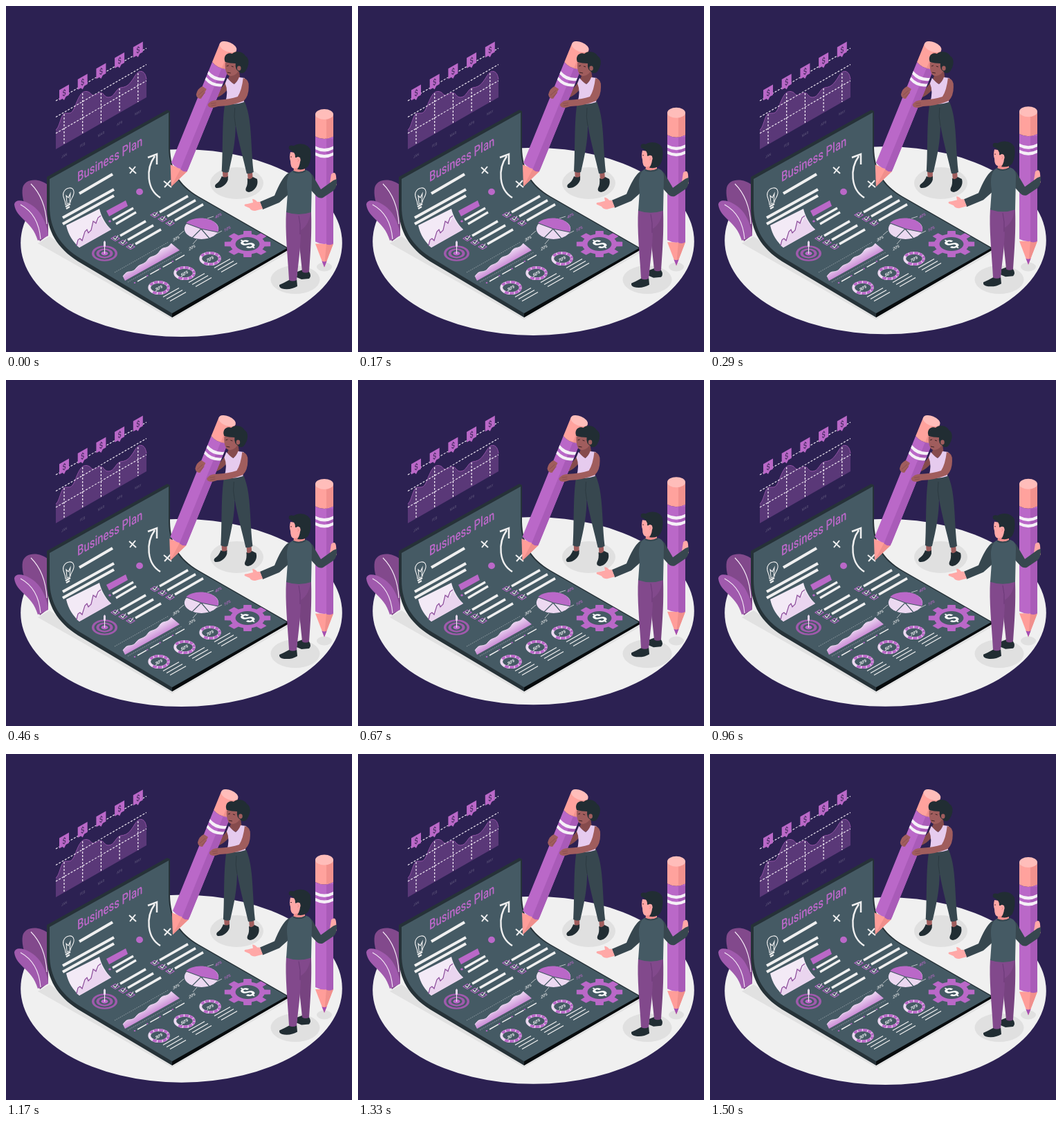
Animation, 500 px wide and 500 px high, one loop 1.54 s. Source, as an HTML page with a canvas:

```html
<!DOCTYPE html>
<html lang="en">
<head>
<meta charset="utf-8">
<title>Business plan</title>
<style>
html, body { margin: 0; width: 100%; height: 100%; overflow: hidden; background: #2c2152; }
canvas { display: block; }
</style>
</head>
<body>
<canvas id="stage" width="500" height="500"></canvas>
<script>
const ctx = document.getElementById('stage').getContext('2d');
const LOOP = 1540, STEP = 1000 / 24, CYCLE = 1500, LEAD_IN = 36;
const C = {
  bg: '#2c2152', floor: '#f0f0f0', shade: '#e0e0e0', paper: '#455a64', ink: '#263238',
  purple: '#ba68c8', deep: '#82498c', leaf: '#a05aad', pale: '#ecd9f1', white: '#fff',
  pants: '#37474f', skin: '#ffa8a7', brown: '#a05d5d', brownDark: '#864b4d', hair: '#212d33'
};

const fill = (d, color) => { ctx.fillStyle = color; ctx.fill(new Path2D(d)); };
const line = (d, color = C.floor, width = 1, dash = []) => {
  ctx.strokeStyle = color;
  ctx.lineWidth = width;
  ctx.setLineDash(dash);
  ctx.stroke(new Path2D(d));
  ctx.setLineDash([]);
};
const oval = (x, y, rx, ry, color) => {
  ctx.fillStyle = color;
  ctx.beginPath();
  ctx.ellipse(x, y, rx, ry, 0, 0, 7);
  ctx.fill();
};
const arc = (x, y, rx, ry, from, to, color, width) => {
  ctx.strokeStyle = color;
  ctx.lineWidth = width;
  ctx.beginPath();
  ctx.ellipse(x, y, rx, ry, 0, from, to);
  ctx.stroke();
};
const within = (matrix, draw) => {
  ctx.save();
  ctx.transform(...matrix);
  draw();
  ctx.restore();
};
const shifted = (x, y, draw) => within([1, 0, 0, 1, x, y], draw);
const wall = (x, y, draw) => within([0.8, -0.455, 0, 1, x, y], draw);
const ground = (x, y, draw) => within([0.85, -0.49, 0.85, 0.49, x, y], draw);
const label = (text, size, color, weight = 400, align = 'center') => {
  ctx.font = `${weight} ${size}px Roboto, sans-serif`;
  ctx.textAlign = align;
  ctx.textBaseline = 'alphabetic';
  ctx.fillStyle = color;
  ctx.fillText(text, 0, 0);
};

function floatingChart() {
  const wave = 'M72 179C78 175 79 155 86 155C92 155 95 156 99 147C105 131 109 123 116 123.5C123 124 122 129 127 129C132 129 132 125 137 125.5C142 126 142 132 148 132C157 132 158 120 166 118C176 117 179 112 184 105C189 96 192 94 196 94.5C201 96 202 101 203 106';
  fill(wave + 'V132L72 207Z', '#5a3878');
  line(wave, '#9353a6', 1);
  for (const y of [137, 160.5, 184]) line(`M72 ${y}L203 ${y - 76}`, '#f5eff8', 1.1, [3, 2]);
  const tops = [156, 126, 126, 119, 97];
  ['JAN', 'FEB', 'MAR', 'APR', 'MAY'].forEach((month, i) => {
    const x = 84 + 26.7 * i, y = 125.5 - 15.5 * i;
    line(`M${x} ${tops[i]}V${200 - 15.3 * i}`, '#f5eff8', 1.2, [3, 2]);
    fill(`M${x - 7} ${y - 4}l14 -8v15l-4.5 2.6l-2.5 5l-2.5 -2.2l-4.5 2.6Z`, C.purple);
    wall(x, y + 4, () => label('$', 11.5, '#4b2d66', 500));
    wall(x, 218 - 15.5 * i, () => label(month, 5.4, '#625b7d'));
  });
}

function plant() {
  fill('M49 340C34 304 21 282 24 263C27 249 48 248 61 259V331Z', C.deep);
  fill('M46 339C37 309 15 308 12 287C13 275 38 283 49 299C58 312 61 328 61 332Z', C.leaf);
  line('M36 257Q57 278 59 315M21 287Q47 301 50 337', '#f4e9f6', 1.1);
}

function sheet() {
  fill('M46 343L63 333L110 366L240 446L408 349L414 353L240 453Z', '#e1e1e1');
  fill('M59 247L233 150L237 152V205C238 238 250 258 278 275L407 349V353L240 450L104 369C74 350 59 325 59 292Z', C.ink);
  fill('M240 444L407 348.5V353L240 450Z', '#070b0d');
  fill('M63 250L235 154V206C236 239 249 260 277 276L406 350L240 444L108 365C78 347 63 322 63 289Z', C.paper);
}

function bulb() {
  line('M86 287C86 279 81 277 83 270C86 262 97 260 98 268C99 275 93 278 93 284ZM88 285L87 274L90 277L93 271L92 283', C.floor, 1.1);
  line('M86 290L93 286M87 293L92 290', C.floor, 2.2);
}

function checklist(x, y, length) {
  for (let i = 0; i < 3; i++) {
    const px = x + 11 * i, py = y + 6 * i;
    line(`M${px - 6} ${py}l6 -3.6l6 3.6l-6 3.6Z`, C.purple, 1.1);
    line(`M${px - 3} ${py - 1}l3 2.5l4 -6`, C.floor, 1.1);
    line(`M${px + 7} ${py - 4}l${length} ${-length * 0.57}`, C.floor, 3.6);
  }
}

function target() {
  oval(142.5, 357.5, 18.5, 11.3, C.leaf);
  oval(142.5, 357.5, 15, 9, C.paper);
  oval(142.5, 357.5, 12, 7.2, C.leaf);
  oval(142.5, 357.5, 8, 4.7, C.paper);
  oval(142.5, 357.5, 5, 3, C.purple);
  line('M142.5 358V343', C.floor, 1.1);
  fill('M141 347V341L142.5 339L144 341V347L142.5 349Z', C.pale);
}

function areaChart() {
  const crest = 'M169 391C176 379 181 388 188 379C194 371 199 376 206 365C211 360 216 364 223 353C228 347 233 352 239 343';
  const tint = ctx.createLinearGradient(199, 367, 209, 385);
  tint.addColorStop(0, '#ead0f0');
  tint.addColorStop(1, C.purple);
  fill(crest + 'L251 353L172 397Z', tint);
  line(crest, C.pale, 1);
  line('M157 385L235 341M176 399L254 356', '#a9b2b7', 0.8, [1.5, 1.5]);
  for (let i = 0; i < 4; i++) {
    const x = 190 + 18.3 * i, y = 398 - 10.3 * i;
    line(`M${x} ${y}l13 -7.3`, C.floor, 1.5);
    oval(x - 4, y + 2, 1.3, 1, C.purple);
  }
}

function pie() {
  oval(282.5, 322, 24.7, 15, C.pale);
  fill('M282 322L260 314C267 305 292 303 303 314Q309 320 306 327Z', C.purple);
  line('M258 313L282 322L307 327M282 322L268 336M282 322L295 337', C.paper, 1.2);
  line('M291 307L300 304M304 329L312 325M276 337L270 344M257 325L250 331', C.floor, 0.7);
  const notes = [['40%', 307, 305, C.purple], ['10%', 320, 324, C.purple], ['20%', 269, 351, C.floor], ['30%', 246, 338, C.floor]];
  for (const [text, x, y, color] of notes) wall(x, y, () => label(text, 6.3, color, 500));
}

function gear() {
  ground(349, 344, () => {
    ctx.fillStyle = C.purple;
    ctx.beginPath();
    for (let i = 0; i < 8; i++) {
      const a = i * Math.PI / 4;
      for (const [turn, r] of [[-0.39, 21], [-0.24, 21], [-0.17, 28], [0.17, 28], [0.24, 21]])
        ctx.lineTo(r * Math.cos(a + turn), r * Math.sin(a + turn));
    }
    ctx.fill();
    oval(0, 0, 14.5, 14.5, C.paper);
    ctx.translate(0, 9);
    label('$', 25, C.white, 700);
  });
}

function donut(x, y, text) {
  arc(x, y, 13.8, 8.2, 0, 7, C.pale, 3.8);
  for (let i = 0; i < 9; i++) {
    const from = 3.6 + i * 0.56;
    arc(x, y, 13.8, 8.2, from, from + 0.46, C.purple, 3.8);
  }
  wall(x, y + 3, () => label(text, 7, C.white, 700));
  for (let i = 0; i < 3; i++) line(`M${x + 6 + 5 * i} ${y + 13.5 + 3 * i}l23 -13`, C.floor, 1.3);
}

function sheetContent() {
  within([0.745, -0.42, 0, 1, 103, 254.5], () => label('Business Plan', 20, C.purple, 500, 'left'));
  bulb();
  line('M106 271L154 243M82 306L156 265M82 315L156 274', C.floor, 4.2);
  line('M178 233L188 242M179 242L187 232M228 253L239 262M229 262L238 252', C.floor, 2);
  line('M223 277C203 265 202 235 215 217M205 219L218 214L218 229', C.floor, 2.5);
  oval(193, 268.5, 5, 4.7, C.purple);

  fill('M87 317L135 293C138 305 144 315 152 323L106 349C97 341 90 331 87 317Z', '#f3eaf6');
  fill('M102 346L105 335L111 338L116 323L122 327L128 309L133 313L137 304Q142 315 152 323L106 349Z', '#ead5ef');
  line('M102 346L104 338L107 336L110 339L114 326L117 323L119 328L123 324L126 311L130 314L133 306L137 303', '#8b4a9a', 1.2);

  fill('M145 296L173 281L176 289L149 304Z', C.purple);
  oval(150, 311, 1.8, 1.6, C.purple);
  line('M154 309L184 292M159 315L188 298', C.floor, 3.2);
  checklist(158, 336, 37);
  checklist(215, 302, 41);
  target();
  areaChart();
  pie();
  gear();
  donut(295, 365, '70%');
  donut(258, 386, '50%');
  donut(221, 407, '30%');
}

// Drawn with the tip at the origin, pointing down.
function pencil(cone, bandY, eraserY, topY, ry, lead) {
  const w = 13, split = 3;
  const band = (top, bottom, color) =>
    fill(`M${-w} ${top}Q0 ${top + 7} ${w} ${top}V${bottom}Q0 ${bottom + 7} ${-w} ${bottom}Z`, color);
  fill(`M0 0L${-w} ${-cone}H${w}Z`, '#ff9d99');
  fill(`M0 0L${split} ${-cone}H${w}Z`, '#f08f8c');
  if (lead) fill('M0 0L-3.6 -9Q0 -7 3.6 -9Z', '#a24fb3');
  band(eraserY, -cone - 3, C.purple);
  fill(`M${split} ${eraserY + 3}H${w}V${-cone}Q9 ${-cone + 3} ${split} ${-cone + 1}Z`, '#a95bb8');
  band(bandY, bandY + 4.5, '#f5f0f7');
  band(bandY + 9, bandY + 13.5, '#f5f0f7');
  band(topY, eraserY, '#ffa29d');
  fill(`M${split} ${topY}H${w}V${eraserY}L${split} ${eraserY + 3}Z`, '#f2918d');
  oval(0, topY, w, ry, '#ffbdba');
}

function woman() {
  line('M323 108Q316 125 300 130', C.brownDark, 8);
  within([0.926, 0.377, -0.377, 0.926, 239, 261], () => pencil(29, -175, -189, -218, 7, false));

  fill('M313 236H321V248L314 252ZM349 238L356 237L357 251L350 252Z', C.brown);
  fill('M317 139C312 165 314 208 312 239Q317 242 322 240C328 215 332 195 332 172C337 200 344 223 348 242Q353 243 358 240C355 215 355 185 352 165Q350 150 345 138Z', C.pants);
  line('M331 147Q329 160 332 173', '#2c3a41', 1);
  fill('M312 246Q317 249 321 246V251C319 258 311 264 304 263Q301 261 303 258Q310 253 312 246Z', C.hair);
  fill('M349 249Q354 252 357 247L363 250C366 259 359 268 351 269Q345 268 347 263Q350 258 349 249Z', C.hair);

  fill('M325 96L337 93L339 107L329 113L321 106Z', C.brownDark);
  fill('M320 104Q327 112 330 113Q335 109 337 103L345 104Q349 112 345 125L344 139Q330 144 317 140Q322 123 317 112Z', '#e6cbee');
  fill('M317 82Q316 92 320 99Q326 104 333 98L342 88L333 76Z', C.brown);
  fill('M317 81C313 72 321 66 327 69C333 63 344 67 346 72C353 76 351 86 348 91C346 97 340 99 337 95Q331 92 332 83Q324 83 317 81Z', C.hair);
  oval(337, 90, 2.8, 3.4, C.brown);
  line('M319 87L322 86M326 87L329 88M320 96L325 97', '#3c2225', 1);

  fill('M343 104Q352 106 351 117Q351 130 344 137Q328 144 307 145L300 147Q291 147 292 142Q296 136 304 136Q324 135 335 131Q341 122 343 104Z', C.brown);
  line('M296 141L304 140M297 144L304 143', C.brownDark, 0.8);
  fill('M290 120L286 128L282 134Q276 134 275 128Q277 119 284 116Z', C.brown);
  line('M278 129L286 122M281 132L288 125', C.brownDark, 0.8);
}

function man() {
  shifted(460, 377.5, () => pencil(34, -175, -189, -221, 7.5, true));

  fill('M470 243Q476 238 477 246L478 258L473 266L467 262Z', C.skin);
  fill('M434 240Q442 240 445 248L455 265L473 252L478 250Q479 262 473 267L458 277Q452 279 447 273L436 261Z', C.pants);

  fill('M421 384L429 381L438 384Q442 390 438 394L427 395L420 392Z', C.hair);
  fill('M409 396L420 394L421 405Q413 410 402 409Q394 408 395 403Q402 400 409 396Z', C.hair);
  fill('M421 297H441C442 330 440 355 438 384Q433 387 428 384C426 360 422 335 421 315Z', '#774380');
  fill('M405 296H440Q439 316 426 324C426 349 422 375 420 396Q414 399 409 396C407 360 403 326 405 296Z', C.deep);
  line('M423 303Q426 315 425 330', '#6a3977', 1);

  fill('M417 230H432V242L423 245L415 240Z', '#f28f8e');
  fill('M407 242Q412 239 415 240L413 268L395 284L371 294L367 283L388 274Q398 249 407 242Z', C.pants);
  fill('M414 238Q424 243 433 237Q443 239 442 252L441 298Q423 304 405 298L407 270Q403 245 414 238Z', C.paper);
  line('M415 239Q424 243 433 238', '#34464f', 2);

  fill('M367 283L371 293L360 296Q354 296 352 292L345 289Q343 286 349 286L357 284L356 279Q360 279 363 283Z', C.skin);
  fill('M411 211Q409 219 411 224Q411 234 416 235L428 232L431 214Z', C.skin);
  fill('M409 207Q407 200 416 202C423 197 437 199 440 208Q442 221 437 231Q432 238 421 236Q426 229 425 219L418 219Q419 211 409 207Z', C.hair);
  oval(422, 222.5, 3.6, 4.6, C.skin);
  line('M421.5 221Q424.5 223 421.5 225', '#e57f7e', 0.8);
  line('M411 218L413 218', '#5b3039', 1);
}

const SHAKE = [0, -1, 2, -4, 4, -4, 4, -4, 2, -1, 0];
function shakeAt(progress) {
  const p = progress * 10, i = Math.floor(p);
  return SHAKE[i] + (SHAKE[i + 1] - SHAKE[i]) * (p - i);
}

function render(time) {
  const tick = Math.min(36, Math.floor((time % LOOP + 4) / STEP));
  const progress = (tick * STEP + LEAD_IN) % CYCLE / CYCLE;
  const lift = -10 * (1 - Math.abs(1 - 2 * progress));

  ctx.fillStyle = C.bg;
  ctx.fillRect(0, 0, 500, 500);
  floatingChart();
  shifted(0, lift, () => oval(253.5, 343, 232.3, 135.6, C.floor));
  plant();
  oval(333.5, 256, 38.5, 23, C.shade);
  oval(418, 395.5, 35.5, 20.5, C.shade);
  oval(460, 377, 11, 6.5, C.shade);
  sheet();
  sheetContent();
  shifted(shakeAt(progress), 0, woman);
  shifted(0, lift + 0.5, man);
}

const start = performance.now();
function loop() {
  render(performance.now() - start);
  requestAnimationFrame(loop);
}
loop();
</script>
</body>
</html>
```
